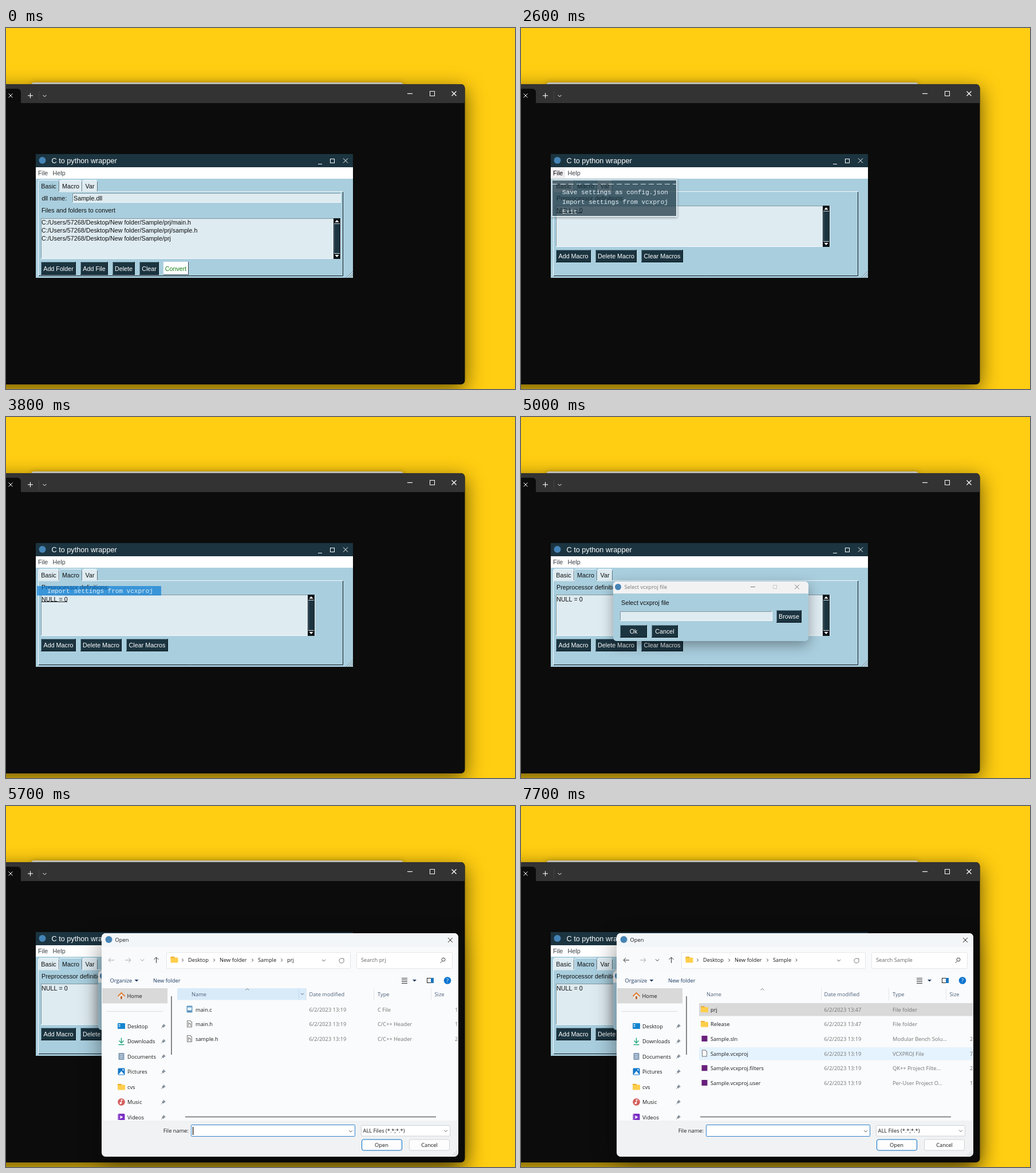
Write an HTML page with a canvas that moves like this. It is 889 by 630 pixels and loops after 8000 ms.

```html
<!DOCTYPE html>
<html lang="en">
<head>
<meta charset="utf-8">
<title>Wrapper tool demo</title>
<style>
html, body { margin: 0; width: 100%; height: 100%; overflow: hidden; background: #ffcd11; }
canvas { display: block; }
</style>
</head>
<body>
<canvas id="stage" width="889" height="630"></canvas>
<script>
const W = 889, H = 630, LOOP = 8000;
const stage = document.getElementById('stage');
const screenCtx = stage.getContext('2d');
const buffer = document.createElement('canvas');
buffer.width = W;
buffer.height = H;
const bufferCtx = buffer.getContext('2d');
let g = screenCtx;

const TK = '10.75px "Liberation Sans", Arial, sans-serif';
const TITLE = '12.7px "Liberation Sans", Arial, sans-serif';
const MONO = '11px "Liberation Mono", monospace';
const UI = '9.3px "Open Sans", sans-serif';
const NAVY = '#1b3440', SKY = '#a9cede', PALE = '#deebf1', BLUE = '#0067c0';

const rect = (x, y, w, h, color) => { g.fillStyle = color; g.fillRect(x, y, w, h); };
const frame = (x, y, w, h, color) => {
  g.strokeStyle = color;
  g.lineWidth = 1;
  g.strokeRect(x + .5, y + .5, w - 1, h - 1);
};
function text(s, x, y, font, color, align = 'left') {
  g.font = font;
  g.fillStyle = color;
  g.textAlign = align;
  g.fillText(s, x, y);
}
function line(color, width, ...p) {
  g.strokeStyle = color;
  g.lineWidth = width;
  g.beginPath();
  for (let i = 0; i < p.length; i += 2) g.lineTo(p[i], p[i + 1]);
  g.stroke();
}
function poly(color, ...p) {
  g.fillStyle = color;
  g.beginPath();
  for (let i = 0; i < p.length; i += 2) g.lineTo(p[i], p[i + 1]);
  g.fill();
}
function round(x, y, w, h, r, fill, stroke) {
  g.beginPath();
  g.roundRect(x, y, w, h, r);
  if (fill) { g.fillStyle = fill; g.fill(); }
  if (stroke) { g.strokeStyle = stroke; g.lineWidth = 1; g.stroke(); }
}
function disc(x, y, r, color) {
  g.fillStyle = color;
  g.beginPath();
  g.arc(x, y, r, 0, 7);
  g.fill();
}
function shadowed(color, blur, dy, draw) {
  g.save();
  g.shadowColor = color;
  g.shadowBlur = blur;
  g.shadowOffsetY = dy;
  draw();
  g.restore();
}
function cross(x, y, r, color, width = 1) {
  line(color, width, x - r, y - r, x + r, y + r);
  line(color, width, x + r, y - r, x - r, y + r);
}
const chevron = (x, y, r, color) => line(color, 1, x - r, y - r / 2, x, y + r / 2, x + r, y - r / 2);
const angle = (x, y) => line('#444', 1, x - 1.2, y - 2.5, x + 1.2, y, x - 1.2, y + 2.5);
const caretDown = (x, y, color) => poly(color, x - 3.5, y - 1.5, x + 3.5, y - 1.5, x, y + 2);

// Paints a window as one layer so it can fade and scale as a whole.
function layer(alpha, scale, cx, cy, draw) {
  if (alpha >= 1) return draw();
  bufferCtx.clearRect(0, 0, W, H);
  g = bufferCtx;
  draw();
  g = screenCtx;
  g.save();
  g.globalAlpha = alpha;
  g.translate(cx, cy);
  g.scale(scale, scale);
  g.drawImage(buffer, -cx, -cy);
  g.restore();
}

function desktop() {
  rect(0, 0, W, H, '#ffcd11');
  shadowed('rgba(0,0,0,.3)', 10, 1, () => round(44, 95, 650, 20, 5, '#e4e2da'));
  shadowed('rgba(0,0,0,.6)', 34, 9, () => round(-40, 98, 841.5, 524, 7, '#0c0c0c'));
  round(-40, 98, 841.5, 33, [0, 7, 0, 0], '#333333');
  round(-20, 106, 46, 25, [0, 6, 0, 0], '#0c0c0c');
  cross(8, 118, 3.5, '#fff');
  line('#fff', 1.1, 38, 118, 47, 118);
  line('#fff', 1.1, 42.5, 113.5, 42.5, 122.5);
  line('#444', 1, 57.5, 110, 57.5, 126);
  chevron(67.5, 118.5, 3, '#fff');
  line('#fff', 1.2, 701, 114.5, 710, 114.5);
  frame(740, 110, 9, 9, '#fff');
  cross(782.5, 114.5, 4, '#fff', 1.2);
}

function button(x, y, w, h, label, pressed) {
  rect(x, y, w, h, '#0a161d');
  rect(x, y, w - 1, h - 1, pressed ? '#0a161d' : '#7295a4');
  rect(x + 1, y + 1, w - 2, h - 2, NAVY);
  text(label, x + w / 2, y + h / 2 + 4, TK, '#fff', 'center');
}
function sunken(x, y, w, h) {
  rect(x, y, w, h, '#f4fafc');
  rect(x, y, w - 1, h - 1, '#7f969f');
  rect(x + 1, y + 1, w - 2, h - 2, PALE);
}
function listBox(x, y, w, h) {
  sunken(x, y, w, h);
  const bx = x + w - 1;
  rect(bx, y, 12, h, '#0c1418');
  rect(bx + 1, y + 10, 10, h - 20, NAVY);
  line('#55707d', 1, bx + 1.5, y + 10, bx + 1.5, y + h - 10);
  line('#dce9ee', 1, bx + 1, y + 9.5, bx + 11, y + 9.5);
  line('#dce9ee', 1, bx + 1, y + h - 9.5, bx + 11, y + h - 9.5);
  poly('#fff', bx + 2.5, y + 7, bx + 9.5, y + 7, bx + 6, y + 3);
  poly('#fff', bx + 2.5, y + h - 7, bx + 9.5, y + h - 7, bx + 6, y + h - 3);
  line('#eef6f9', 1, bx + 12.5, y, bx + 12.5, y + h);
}

function tab(x, w, label, active) {
  round(x + .5, 265.5, w - 1, 21, [3, 3, 0, 0], active ? SKY : PALE);
  line('#f3fafc', 1, x + .5, 285, x + .5, 268, x + 2.5, 265.5, x + w - 2, 265.5);
  line('#5b7480', 1, x + w - .5, 268, x + w - .5, 285);
  if (active) rect(x + 1, 285, w - 2, 2, SKY);
  text(label, x + w / 2, 280, TK, '#111', 'center');
}

function basicPage() {
  text('dll name:', 62.5, 300.5, TK, '#111');
  sunken(116, 288, 469, 17);
  text('Sample.dll', 118, 300.5, TK, '#111');
  text('Files and folders to convert', 62, 322, TK, '#111');
  listBox(61, 332, 512, 71);
  ['/main.h', '/sample.h', ''].forEach((file, i) =>
    text('C:/Users/57268/Desktop/New folder/Sample/prj' + file, 62, 343 + 14.2 * i, TK, '#111'));
  button(61, 408, 61, 23, 'Add Folder');
  button(130, 408, 48, 23, 'Add File');
  button(186, 408, 39, 23, 'Delete');
  button(233, 408, 34, 23, 'Clear');
  rect(275, 408, 44, 23, '#36464e');
  rect(275, 408, 43, 22, '#fff');
  text('Convert', 296.5, 423.5, TK, '#168016', 'center');
}
function macroPage(underlined) {
  text('Preprocessor definitions:', 62, 301, TK, '#111');
  listBox(61, 310, 467, 72);
  text('NULL = 0', 62, 321.5, TK, '#111');
  if (underlined) line('#111', 1, 62, 322.5, 107, 322.5);
  button(61, 387, 61, 22, 'Add Macro');
  button(130, 387, 72, 22, 'Delete Macro');
  button(210, 387, 73, 22, 'Clear Macros');
}

function mainWindow(t) {
  rect(52, 220, 554, 216, SKY);
  rect(52, 220, 554, 23, NAVY);
  disc(63.5, 231, 6, '#4584b6');
  text('C to python wrapper', 79.5, 236, TITLE, '#fff');
  line('#fff', 1, 545, 237.5, 552, 237.5);
  frame(566, 228, 8, 8, '#fff');
  cross(593, 231.5, 4, '#fff');
  rect(52, 243, 554, 20, '#fff');
  const hover = t >= 1900 && t < 2900;
  if (hover) rect(54, 244, 23, 18, '#f0eef0');
  text('File', 56, 257, TK, hover ? '#000' : '#3b4247');
  text('Help', 81.5, 257, TK, '#3b4247');

  const macro = t >= 1400;
  line('#f3fafc', 1, 56.5, 433, 56.5, 285.5, 589, 285.5);
  line('#101a1f', 1, 57, 432.5, 588.5, 432.5, 588.5, 286);
  tab(56, 37, 'Basic', !macro);
  tab(93, 40, 'Macro', macro);
  tab(133, 27, 'Var', false);
  if (!macro) basicPage();
  else if (t >= 1500) macroPage(t < 4000);
  for (const d of [3, 6, 10]) {
    line('#4d6570', 1, 605 - d, 435.5, 605.5, 435 - d);
    line('#eaf5f9', 1, 606 - d, 435.5, 605.5, 436 - d);
  }
}

const MENU = ['Save settings as config.json', 'Import settings from vcxproj', 'Exit'];
const menuText = i => text(MENU[i], 72, 290 + 17 * i, MONO, '#fff');
function fileMenu(selected) {
  shadowed('rgba(0,0,0,.55)', 4, 1, () => rect(53, 264, 220, 66, '#dfeaee'));
  rect(55, 266, 216, 62, NAVY);
  g.setLineDash([9, 5]);
  line('#dce9ee', 1, 55, 272.5, 271, 272.5);
  g.setLineDash([]);
  if (selected >= 0) rect(54, 278 + 17 * selected, 217, 17, '#0078d7');
  MENU.forEach((_, i) => menuText(i));
}

function selectDialog(t) {
  const active = t < 5000, ink = active ? '#111' : '#777';
  shadowed(`rgba(0,0,0,${active ? .5 : .36})`, active ? 34 : 22, active ? 12 : 7,
    () => round(161, 287, 341, 104, 6, SKY));
  round(161, 287, 341, 21, [6, 6, 0, 0], '#f2f2f3');
  disc(169.5, 296.5, 5.5, '#4584b6');
  text('Select vcxproj file', 180.5, 300, UI, ink);
  line(ink, 1, 401, 296.5, 409, 296.5);
  frame(440, 293, 7, 7, '#c9c9c9');
  cross(482, 296.5, 3.8, ink);
  text('Select vcxproj file', 175, 327.5, TK, '#111');
  sunken(173, 339, 266, 17);
  if (t < 4400 || (t >= 4700 && t < 4900)) rect(174, 341, 1.5, 13, '#111');
  button(446, 337, 44, 22, 'Browse', t >= 4900 && t < 5000);
  button(173, 363, 47, 22, 'Ok');
  button(228, 363, 46, 22, 'Cancel');
}

function folder(x, y) {
  round(x - 6.5, y - 5, 7, 5, 1, '#e2a119');
  round(x - 6.5, y - 3.5, 13, 9, 1, '#ffce4b');
}
function page(x, y, draw) {
  poly('#737373', x - 4.5, y - 6, x + 1.5, y - 6, x + 4.5, y - 3, x + 4.5, y + 6, x - 4.5, y + 6);
  poly('#fff', x - 3.5, y - 5, x + 1, y - 5, x + 3.5, y - 2.5, x + 3.5, y + 5, x - 3.5, y + 5);
  if (draw) draw(x, y);
}
const icons = {
  folder,
  page,
  header: (x, y) => page(x, y, () => text('h', x, y + 4, UI, '#333', 'center')),
  code(x, y) {
    round(x - 5, y - 6, 10, 12, 1, '#6a9fc9');
    rect(x - 3.5, y - 3, 7, 5, '#e6f3fb');
    line('#47779d', 1, x - 3, y + 4, x + 3, y + 4);
  },
  project: (x, y) => rect(x - 5, y - 5, 10, 10, '#68217a'),
  home(x, y) {
    poly('#e9e4df', x - 4.5, y - 1, x, y - 5, x + 4.5, y - 1, x + 4.5, y + 6, x - 4.5, y + 6);
    rect(x - 1.5, y + 1, 3, 5, '#b86a3a');
    line('#e37a2d', 1.8, x - 6, y + 1, x, y - 5, x + 6, y + 1);
  },
  desktop(x, y) {
    round(x - 6.5, y - 5, 13, 10, 1, '#1585cf');
    rect(x - 5, y - 3, 3, 1.5, '#fff');
    rect(x - 5, y, 3, 1.5, '#bfe4fa');
  },
  download(x, y) {
    line('#18a57b', 1.4, x, y - 6, x, y + 3);
    line('#18a57b', 1.4, x - 4, y - 1, x, y + 3, x + 4, y - 1);
    line('#18a57b', 1.4, x - 5, y + 6, x + 5, y + 6);
  },
  document(x, y) {
    round(x - 5, y - 6, 10, 12, 1, '#7f9ab5');
    for (const d of [-3, 0, 3]) line('#f3f7fb', 1, x - 3, y + d, x + 3, y + d);
  },
  picture(x, y) {
    round(x - 6, y - 6, 12, 12, 1.5, '#1478c8');
    poly('#fff', x - 5, y + 5, x, y - 1, x + 5, y + 5);
    disc(x + 3, y - 3, 1.2, '#fff');
  },
  music(x, y) {
    disc(x, y, 6.3, '#d4605f');
    line('#fff', 1.2, x, y + 2, x, y - 4, x + 3, y - 3);
    disc(x - 1.2, y + 2, 1.8, '#fff');
  },
  video(x, y) {
    round(x - 6, y - 6, 12, 12, 1.5, '#7b2fc4');
    poly('#fff', x - 2, y - 3, x + 3, y, x - 2, y + 3);
    g.setLineDash([1.5, 1.5]);
    line('#dcc2f5', 1, x - 4.5, y - 5, x - 4.5, y + 5);
    g.setLineDash([]);
  }
};
const SIDEBAR = [['Desktop', 'desktop'], ['Downloads', 'download'], ['Documents', 'document'],
  ['Pictures', 'picture'], ['cvs', 'folder'], ['Music', 'music'], ['Videos', 'video']];
const PRJ_FILES = [['main.c', 'code', 'C File', '1'], ['main.h', 'header', 'C/C++ Header', '1'],
  ['sample.h', 'header', 'C/C++ Header', '2']];
const SAMPLE_FILES = [['prj', 'folder', 'File folder', ''], ['Release', 'folder', 'File folder', ''],
  ['Sample.sln', 'project', 'Modular Bench Solu...', '2'], ['Sample.vcxproj', 'page', 'VCXPROJ File', '7'],
  ['Sample.vcxproj.filters', 'project', 'QK++ Project Filte...', '2'],
  ['Sample.vcxproj.user', 'project', 'Per-User Project O...', '1']];

function arrow(x, y, dx, dy, color) {
  line(color, 1, x - 5 * dx, y - 5 * dy, x + 5 * dx, y + 5 * dy);
  const tx = x + 5 * dx, ty = y + 5 * dy;
  line(color, 1, tx - 4 * dx + 4 * dy, ty - 4 * dy + 4 * dx, tx, ty, tx - 4 * dx - 4 * dy, ty - 4 * dy - 4 * dx);
}
function pin(x, y) {
  poly('#85909a', x, y - 4, x + 4, y, x + 2, y + .5, x, y + 3, x - 3, y, x - .5, y - 2);
  line('#85909a', 1, x - 1, y + 1, x - 4, y + 4);
}

function addressBar(t, moved) {
  arrow(184, 269, -1, 0, moved ? '#333' : '#a5a8ab');
  arrow(213, 269, 1, 0, '#a5a8ab');
  chevron(238, 269, 3, moved ? '#333' : '#999');
  arrow(262.5, 269, 0, -1, '#333');
  round(280.5, 255.5, 321, 28, 1, '#fff', '#e2e5e8');
  if (t >= 6100 && t < 7100) {
    const down = t >= 6400 && t < 6500;
    rect(437, 256, 44, 27, down ? '#cce8ff' : '#e5f3ff');
    frame(437, 256, 44, 27, down ? '#99d1ff' : '#cce8ff');
  }
  folder(294, 268);
  const crumbs = [['Desktop', 318], ['New folder', 373], ['Sample', 440]];
  if (!moved) crumbs.push(['prj', 491]);
  for (const [label, x] of crumbs) {
    angle(x - 9.5, 269);
    text(label, x, 272, UI, '#1b1b1b');
  }
  if (moved) angle(481, 269);
  chevron(555, 269.5, 3, '#666');
  g.strokeStyle = '#777';
  g.lineWidth = 1;
  g.beginPath();
  g.arc(586, 270, 4, -.3, 5);
  g.stroke();
  line('#777', 1, 587, 266, 590, 266.5, 590, 269);
  round(612.5, 255.5, 167, 28, 1, '#fff', '#e2e5e8');
  text('Search ' + (moved ? 'Sample' : 'prj'), 620, 272, UI, '#666');
  g.strokeStyle = '#444';
  g.beginPath();
  g.arc(764, 268, 3, 0, 7);
  g.stroke();
  line('#444', 1, 762, 270.5, 758.5, 274);
}

function toolbar() {
  text('Organize', 181.5, 308, UI, '#1c3a63');
  caretDown(228, 304.5, '#1c3a63');
  text('New folder', 257, 308, UI, '#1c3a63');
  for (const y of [300.5, 303.5, 306.5, 309.5]) line('#333', 1, 691, y, 701, y);
  caretDown(713.5, 304.5, '#1c3a63');
  frame(735, 300, 12, 9, '#222');
  rect(742, 300, 5, 9, '#1c75bb');
  disc(771, 304.5, 6.3, '#0a74cf');
  text('?', 771, 308, UI, '#fff', 'center');
}

function sidebar() {
  rect(168, 318, 114, 26.5, '#d9d9d9');
  icons.home(201.5, 331);
  text('Home', 211.5, 334.5, UI, '#1b1b1b');
  line('#d8dcdf', 1, 175, 358.5, 274, 358.5);
  g.save();
  g.beginPath();
  g.rect(167, 317, 124, 231);
  g.clip();
  SIDEBAR.forEach(([label, icon], i) => {
    const y = 384 + 26.5 * i;
    icons[icon](201.5, y);
    text(label, 212, y + 3.5, UI, '#1b1b1b');
    pin(275, y);
  });
  g.restore();
  line('#878787', 2, 289, 332, 289, 434);
}

function hoveredRow(t) {
  if (t < 5700) return 0;
  if (t < 7200) return -1;
  return Math.min(3, Math.floor((t - 7200) / 100));
}

function fileList(t, moved) {
  if (t >= 5700 && t < 5900) {
    rect(299, 318, 225, 20.5, t < 5800 ? '#d9ebf9' : '#edf5fc');
    line('#bcdcf4', 1, 511.5, 318, 511.5, 338);
    chevron(517.5, 328, 2.5, '#4c607a');
  }
  for (const x of [524.5, 642.5, 742.5]) line('#e2e6ea', 1, x, 318, x, 339);
  chevron(421.5, 320, -3, '#777');
  [['Name', 324], ['Date modified', 529.5], ['Type', 649], ['Size', 748.5]]
    .forEach(([label, x]) => text(label, x, 332, UI, '#4c607a'));
  line('#8a8a8a', 2, 313, 542.5, 751, 542.5);
  if (t < 5400 || (moved && t < 6600)) return;

  g.save();
  g.beginPath();
  g.rect(300, 339, 489.5, 200);
  g.clip();
  (moved ? SAMPLE_FILES : PRJ_FILES).forEach(([name, icon, type, size], i) => {
    const y = 355 + 25.7 * i;
    if (moved && i === 0) rect(311, y - 11, 479, 22.5, '#d9d9d9');
    else if (i === hoveredRow(t)) rect(311, y - 11, 479, 22.5, '#e5f3ff');
    icons[icon](320.5, y - .5);
    text(name, 331, y + 3.5, UI, '#1b1b1b');
    text(moved && i < 2 ? '6/2/2023 13:47' : '6/2/2023 13:19', 529.5, y + 3.5, UI, '#737373');
    text(type, 649, y + 3.5, UI, '#737373');
    text(size, 784, y + 3.5, UI, '#737373');
  });
  g.restore();
}

function openDialog(t) {
  const moved = t >= 6500;
  shadowed('rgba(0,0,0,.45)', 40, 14, () => round(167, 222, 623, 390, 7, '#f0f2f4'));
  round(167, 222, 623, 30, [7, 7, 0, 0], '#f3f6f9');
  rect(167, 246, 623, 46, '#f8fafb');
  rect(167, 291, 623, 258, '#fafbfc');
  disc(179.5, 233, 6, '#4584b6');
  text('Open', 190.5, 237, UI, '#1b1b1b');
  cross(776, 234, 4, '#222');
  addressBar(t, moved);
  toolbar();
  sidebar();
  fileList(t, moved);

  text('File name:', 319, 570, UI, '#1b1b1b', 'right');
  round(323.5, 556.5, 286, 20, 1, '#fff', '#2f80c8');
  if ((t >= 5700 && t < 6200) || (t >= 6800 && t < 7300)) rect(326, 560, 1.2, 14, '#000');
  chevron(602, 567.5, 3, '#666');
  round(620.5, 557.5, 155, 18.5, 1, '#fff', '#d0d3d6');
  text('ALL Files (*.*;*.*)', 623.5, 570, UI, '#1b1b1b');
  chevron(768, 567, 3, '#666');
  round(621.5, 582, 70, 19, 3, '#fdfdfd', BLUE);
  text('Open', 656, 594.5, UI, '#1b1b1b', 'center');
  round(704.5, 582, 70, 19, 3, '#fdfdfd', '#d0d3d6');
  text('Cancel', 739.5, 594.5, UI, '#1b1b1b', 'center');
  for (const d of [0, 3, 6])
    for (let k = 0; k <= d; k += 3) rect(780 + d, 608 - k, 1.3, 1.3, '#b5b8ba');
}

function draw(t) {
  g = screenCtx;
  desktop();
  mainWindow(t);
  if (t >= 2600 && t < 3800) {
    const selected = t < 2900 ? -1 : t < 3000 ? 0 : 1;
    layer(t < 2700 ? .72 : 1, 1, 163, 297, () => fileMenu(selected));
  }
  if (t >= 3800 && t < 3900) {
    layer(.65, 1, 163, 303, () => { rect(54, 295, 217, 16.5, '#0078d7'); menuText(1); });
  }
  if (t >= 3900) layer(t < 4000 ? .5 : 1, .95, 331, 339, () => selectDialog(t));
  if (t >= 5200) layer(t < 5300 ? .5 : 1, .95, 478, 417, () => openDialog(t));
}

function tick(now) {
  draw(now % LOOP);
  requestAnimationFrame(tick);
}
draw(0);
requestAnimationFrame(tick);
</script>
</body>
</html>
```
